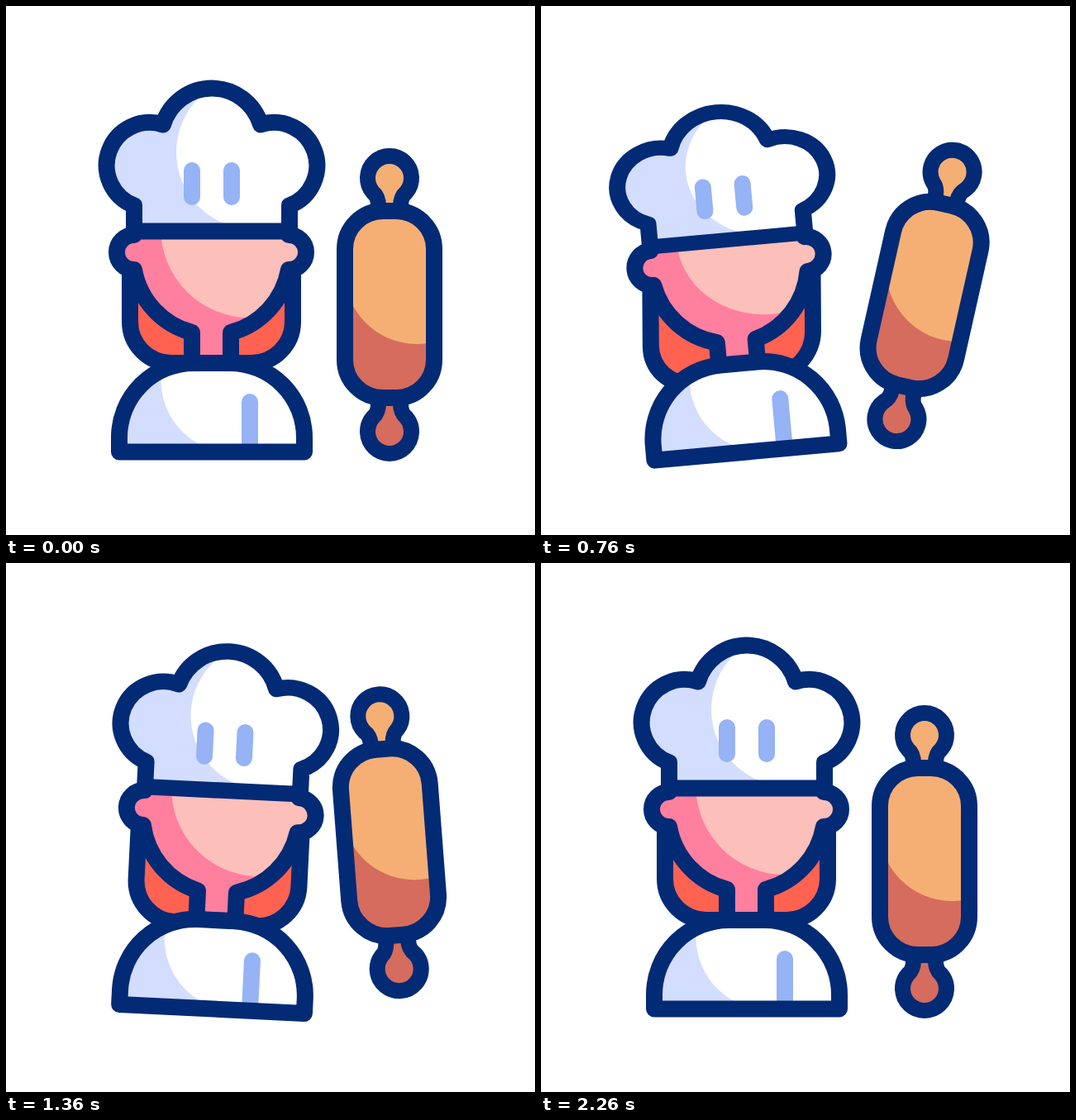
Write an HTML page that moves like this. It is 640 px wide and 640 px high and loops after 2400 ms.

```html
<!DOCTYPE html>
<html lang="en">
<head>
<meta charset="utf-8">
<title>Chef and rolling pin</title>
<style>
  html, body { margin: 0; width: 100%; height: 100%; overflow: hidden; background: #fff; }
  svg { display: block; }
  .line { fill: none; stroke: #032a75; stroke-width: 20; stroke-linejoin: round; stroke-linecap: round; }
  .knob { stroke-width: 19; }
  .mark { fill: none; stroke: #95b3f5; stroke-width: 20; stroke-linecap: round; }
  .hat path { vector-effect: non-scaling-stroke; }
  .white { fill: #fff; }
  .shade { fill: #d3ddfd; }
  .red { fill: #ff6251; }
  .pink { fill: #ff7f9f; }
  .skin { fill: #fdbfb9; }
  .wood { fill: #f5af74; }
  .bark { fill: #d56c5d; }
</style>
</head>
<body>
<svg width="640" height="640" viewBox="0 0 640 640">
  <defs>
    <path id="hatShape" d="M155 272.5V241.4A52 52 0 0 1 190 143.5A61.6 61.6 0 0 1 308 143.5A52 52 0 0 1 343 241.4V272.5Z"/>
    <path id="faceShape" d="M155 277A21 21 0 0 0 155 319A96 96 0 0 0 225 395V460H272V395A96 96 0 0 0 342 319A21 21 0 0 0 342 277"/>
    <path id="hairShape" d="M150 300V382A50 50 0 0 0 200 432H297A50 50 0 0 0 347 382V300"/>
    <path id="coatShape" d="M137 539.5V522A90 90 0 0 1 227 432H271A90 90 0 0 1 361 522V539.5Z"/>
    <rect id="rollerShape" x="410" y="248" width="108" height="226" rx="46"/>
    <path id="knobShape" d="M450.5 242C450.5 233 448 229 444 225.5A26.5 26.5 0 1 1 484 225.5C480 229 477.5 233 477.5 242"/>
    <clipPath id="hatClip"><use href="#hatShape"/></clipPath>
    <clipPath id="faceClip"><use href="#faceShape"/></clipPath>
    <clipPath id="coatClip"><use href="#coatShape"/></clipPath>
    <clipPath id="rollerClip"><use href="#rollerShape"/></clipPath>
  </defs>

  <g id="chef">
    <g id="head">
      <g id="hair">
        <use href="#hairShape" class="red"/>
        <use href="#hairShape" class="line"/>
      </g>
      <use href="#faceShape" class="pink"/>
      <g clip-path="url(#faceClip)">
        <circle class="skin squash" cx="295" cy="269.5" r="107.7"/>
      </g>
      <use href="#faceShape" class="line"/>
      <g class="hat squash">
        <use href="#hatShape" class="shade"/>
        <path class="white" clip-path="url(#hatClip)" d="M299 84A93 93 0 0 0 299 270H400V84Z"/>
        <path class="mark" d="M225 199V231M273 199V231"/>
        <use href="#hatShape" class="line"/>
      </g>
    </g>
    <use href="#coatShape" class="shade"/>
    <g clip-path="url(#coatClip)">
      <path class="white" d="M187.5 425V453A87.5 87.5 0 0 0 275 540.5H380V425Z"/>
      <path class="mark" d="M295 479V540"/>
    </g>
    <use href="#coatShape" class="line"/>
  </g>

  <g id="pin">
    <use href="#knobShape" class="wood"/>
    <use href="#knobShape" class="line knob"/>
    <g transform="matrix(1 0 0 -1 0 723)">
      <use href="#knobShape" class="bark"/>
      <use href="#knobShape" class="line knob"/>
    </g>
    <use href="#rollerShape" class="bark"/>
    <circle class="wood" clip-path="url(#rollerClip)" cx="497" cy="321.5" r="87.4"/>
    <path class="wood" clip-path="url(#rollerClip)" d="M410 240H520V322H410Z"/>
    <use href="#rollerShape" class="line"/>
  </g>
</svg>
<script>
  const LOOP = 2400;

  // Keys are [time, value] pairs
  const tracks = {
    squash: [[200, 0], [700, 1], [1200, 0], [1700, 1], [2267, 0]],
    lean: [[300, 0], [900, -6], [1300, 3], [1700, 0]],
    sway: [[200, 0], [700, 5], [1200, 0]],
    lift: [[400, 0], [1200, -26], [2000, 0]],
    spin: [[400, 0], [800, 13], [1200, -9], [1600, 4], [2000, 0]]
  };

  const smooth = x => x * x * (3 - 2 * x);

  function valueAt(keys, t) {
    if (t <= keys[0][0]) return keys[0][1];
    for (let i = 1; i < keys.length; i++) {
      const [t0, a] = keys[i - 1], [t1, b] = keys[i];
      if (t < t1) return a + (b - a) * smooth((t - t0) / (t1 - t0));
    }
    return keys[keys.length - 1][1];
  }

  const byId = id => document.getElementById(id);
  const chef = byId('chef'), head = byId('head'), hair = byId('hair'), pin = byId('pin');
  const squashed = document.querySelectorAll('.squash');
  const move = (el, transform) => el.setAttribute('transform', transform);
  const aboutLine = (y, transform) => `translate(0 ${y}) ${transform} translate(0 ${-y})`;

  function draw(t) {
    const at = name => valueAt(tracks[name], t);
    const squash = at('squash'), drop = 9.9 * squash;
    move(chef, `rotate(${at('lean')} 249 540)`);
    move(head, `translate(0 ${drop})`);
    // The hair sinks further than the face and trails the lean
    move(hair, `translate(0 ${drop}) ` + aboutLine(322, `skewX(${-at('sway')})`));
    // Flatten towards the hat band
    squashed.forEach(el => move(el, aboutLine(272.5, `scale(1 ${1 - 0.105 * squash})`)));
    move(pin, `translate(0 ${at('lift')}) rotate(${at('spin')} 464 361.5)`);
  }

  function tick() {
    draw(performance.now() % LOOP);
    requestAnimationFrame(tick);
  }
  tick();
</script>
</body>
</html>
```
